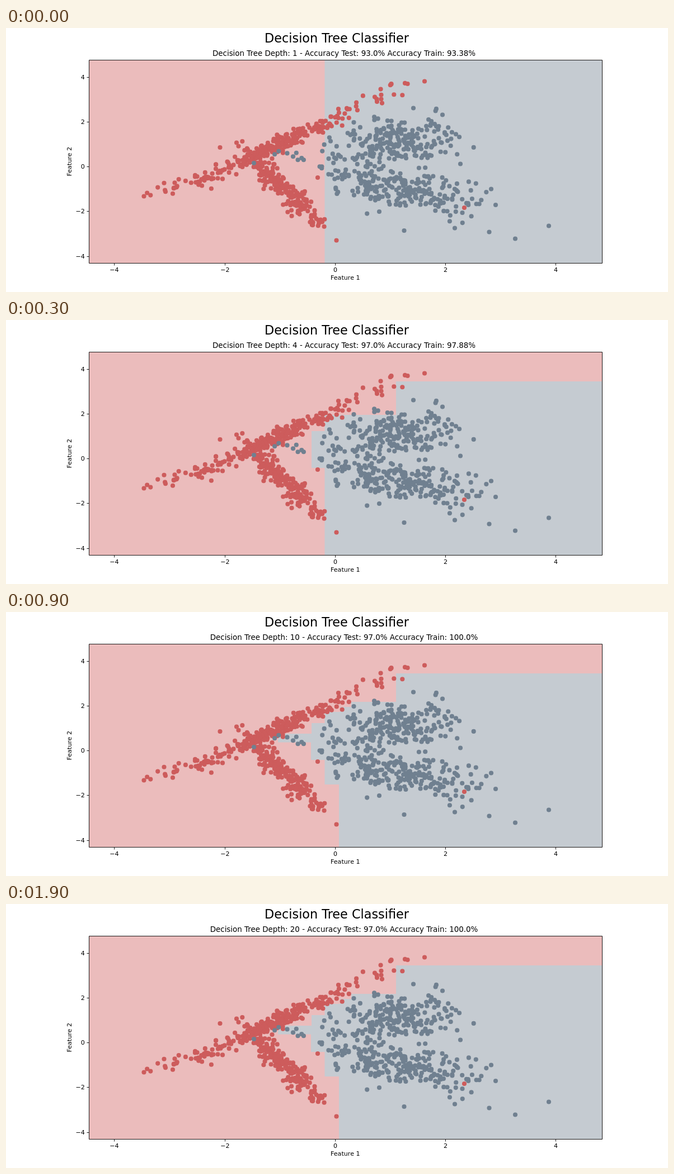
Animation of 1183 by 473 pixels, one loop 2000 ms. Source, as an HTML page:

```html
<!DOCTYPE html>
<html lang="en">
<head>
<meta charset="utf-8">
<title>Decision Tree Classifier</title>
<style>
  html, body { margin: 0; width: 100%; height: 100%; overflow: hidden; background: #fff; }
  svg { display: block; width: 100vw; height: 100vh; }
  text { font-family: "DejaVu Sans", Verdana, sans-serif; font-size: 11.11px; fill: #000; text-anchor: middle; }
  #title { font-size: 22.35px; }
  #caption { font-size: 13.42px; }
  #axes { fill: none; stroke: #000; stroke-width: 0.89; }
</style>
</head>
<body>
<svg viewBox="0 0 1183 473">
  <rect x="148.5" y="57.5" width="917" height="364" fill="#ebbcbc"/>
  <path id="region" fill="#c5cbd1"/>
  <g id="dots"></g>
  <path id="axes"/>
  <g id="labels">
    <text id="title" x="591" y="26">Decision Tree Classifier</text>
    <text id="caption" x="604" y="50"></text>
    <text x="606.3" y="450.7">Feature 1</text>
    <text transform="translate(117 239.3) rotate(-90)">Feature 2</text>
  </g>
</svg>
<script>
const $ = id => document.getElementById(id);
const RED = '#cd5c5c', GREY = '#708090';
const LOOP = 2000, STEP = 100;

function add(parent, tag, attrs, text) {
  const el = document.createElementNS('http://www.w3.org/2000/svg', tag);
  for (const key in attrs) el.setAttribute(key, attrs[key]);
  if (text) el.textContent = text;
  parent.appendChild(el);
}

// Seeded random numbers keep the scatter identical on every load.
let seed = 71;
function rand() {
  seed = (seed + 0x6d2b79f5) | 0;
  let t = Math.imul(seed ^ (seed >>> 15), 1 | seed);
  t = (t + Math.imul(t ^ (t >>> 7), 61 | t)) ^ t;
  return ((t ^ (t >>> 14)) >>> 0) / 4294967296;
}
// Bell-shaped noise with standard deviation 1.
const noise = () => (rand() + rand() + rand() + rand() - 2) * Math.sqrt(3);

function dot(fill, x, y) {
  add($('dots'), 'circle', { cx: x.toFixed(1), cy: y.toFixed(1), r: 4.05, fill });
}

// Points gathered around the middle of a segment, scattered off it by spread.
function band(count, fill, [x0, y0], [x1, y1], spread) {
  for (let i = 0; i < count; i++) {
    const t = (rand() + rand()) / 2;
    dot(fill, x0 + (x1 - x0) * t + spread * noise(), y0 + (y1 - y0) * t + spread * noise());
  }
}

function drawDots() {
  // Rising arm, falling arm and their thin ends
  band(205, RED, [372, 262], [622, 148], 6.5);
  band(205, RED, [412, 205], [568, 358], 9);
  band(38, RED, [310, 285], [435, 240], 9);
  band(14, RED, [235, 300], [345, 272], 6);
  band(22, RED, [570, 165], [740, 95], 8);
  band(8, RED, [535, 345], [580, 350], 5);

  // Upper and lower cluster, the gap before them and the far side
  band(215, GREY, [585, 215], [820, 192], 20);
  band(215, GREY, [575, 262], [850, 316], 18);
  band(25, GREY, [550, 245], [640, 245], 16);
  band(8, GREY, [480, 232], [560, 232], 6);
  band(8, GREY, [800, 300], [870, 300], 16);

  // Outliers
  for (const [x, y] of [[748, 95.5], [688.5, 100], [590.5, 380.5], [819, 322],
    [382.5, 214], [412, 205.5], [557, 268], [246.5, 301.5]]) dot(RED, x, y);
  for (const [x, y] of [[970, 354.5], [910, 377.5], [863.5, 365.5], [875, 317], [802, 358.5],
    [711.5, 363], [780, 155.5], [728, 143.5], [812, 243.5], [443, 242]]) dot(GREY, x, y);
}

function drawAxes() {
  let path = 'M148.5 57.5H1065.5V421.5H148.5Z';
  for (let v = -4; v <= 4; v += 2) {
    const x = Math.floor(588.3 + 98.6 * v) + 0.5;
    const y = Math.floor(248.6 - 40.15 * v) + 0.5;
    const label = String(v).replace('-', '\u2212');
    path += `M${x} 421.5v4M148.5 ${y}h-4`;
    add($('labels'), 'text', { x, y: 437 }, label);
    add($('labels'), 'text', { x: 140.8, y: y + 3.9, style: 'text-anchor:end' }, label);
  }
  $('axes').setAttribute('d', path);
}

// Grey decision region by depth; the last entry holds for all deeper trees.
const upper = 'M1065 110H697V161H617V170H597V179H569.5V199H546V218';
const lower = 'V265H569.5V309H595V421H1065Z';
const regions = [
  'M569.5 57.5H1065V421H569.5Z',
  'M569.5 170H1065V421H569.5Z',
  'M697 57.5H1065V421H546V199H569.5V170H697Z',
  'M1065 110H697V170H569.5V199H546V265H569.5V421H1065Z',
  upper + 'H491V265H569.5V421H1065Z',
  upper + 'H491' + lower,
  upper + 'H486V233.5H545' + lower
];

// Test and train accuracy by depth.
const scores = [
  ['93.0', '93.38'], ['96.5', '95.62'], ['97.0', '96.5'], ['97.0', '97.88'], ['97.5', '98.75'],
  ['97.5', '99.38'], ['97.0', '99.62'], ['97.0', '99.88'], ['97.0', '100.0']
];
const pick = (list, depth) => list[Math.min(depth, list.length) - 1];

let shown = 0;
function update(time) {
  const depth = Math.floor((time % LOOP) / STEP) + 1;
  if (depth === shown) return;
  shown = depth;
  const [test, train] = pick(scores, depth);
  $('region').setAttribute('d', pick(regions, depth));
  $('caption').textContent =
    `Decision Tree Depth: ${depth} - Accuracy Test: ${test}% Accuracy Train: ${train}%`;
}

drawDots();
drawAxes();
const start = performance.now();
function frame() {
  update(performance.now() - start);
  requestAnimationFrame(frame);
}
frame();
</script>
</body>
</html>
```
